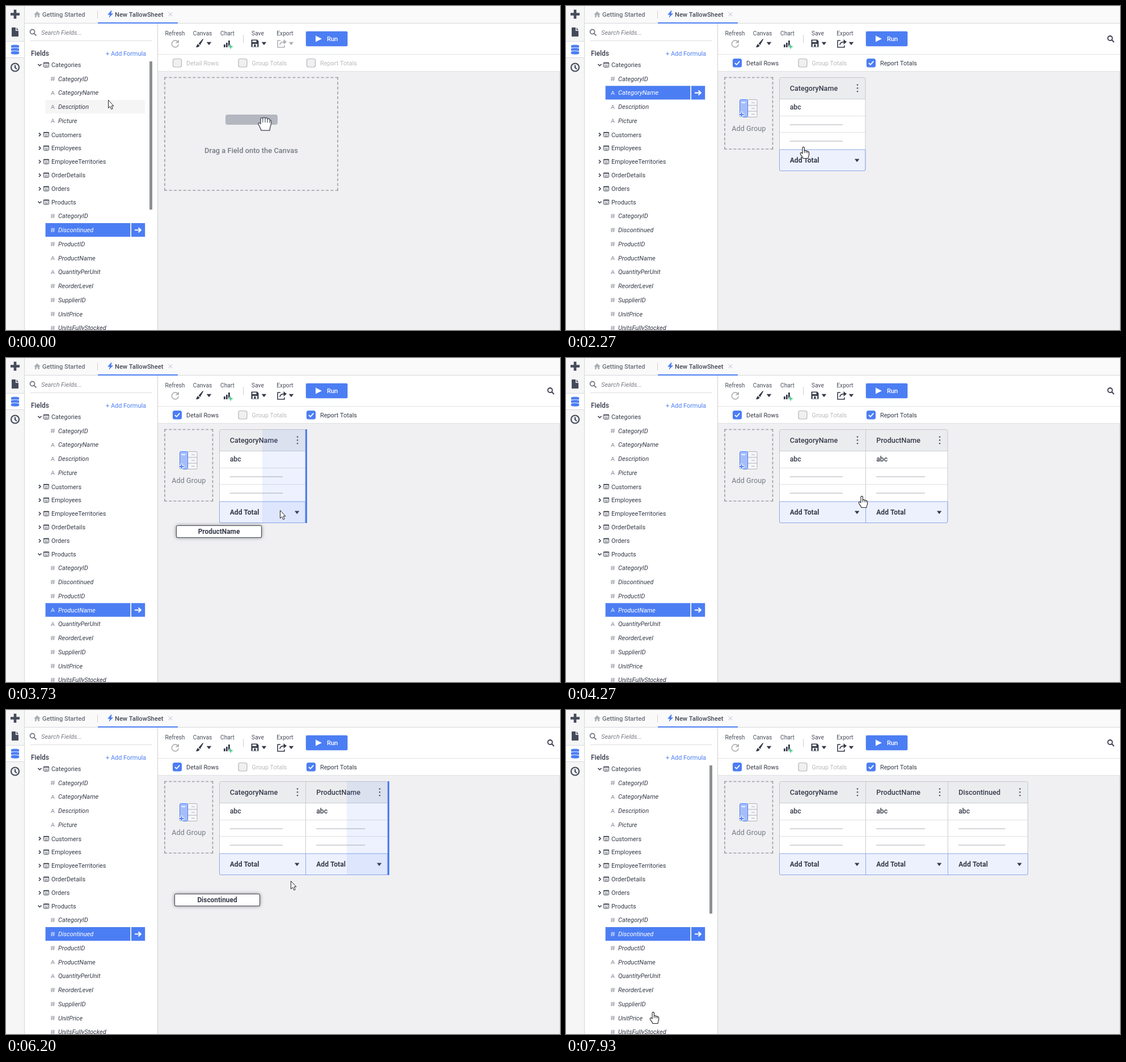
An HTML page with a canvas for the animation above (8 s loop, 977 by 573 pixels).

```html
<!DOCTYPE html>
<html lang="en">
<head>
<meta charset="utf-8">
<title>Report designer</title>
<style>
html, body { margin: 0; width: 100%; height: 100%; overflow: hidden; background: #fff; }
canvas { display: block; }
</style>
</head>
<body>
<canvas id="stage" width="977" height="573"></canvas>
<script>
const c = document.getElementById('stage').getContext('2d');
const LOOP = 8000, FPS = 15;
const BLUE = '#4c7ef3', INK = '#363b49', MUTED = '#b9babf', LINE = '#d6d7db', BG = '#f0f0f2';

// Cursor path: step, x, y
const PATH = [
  [0, 180, 166], [5, 174, 150], [14, 174, 150], [16, 205, 162], [19, 349, 218], [20, 384, 232], [22, 422, 246],
  [33, 422, 246], [36, 402, 270], [41, 262, 405], [44, 208, 448], [46, 205, 436], [48, 205, 436],
  [49, 205, 418], [50, 235, 412], [55, 452, 288], [57, 504, 256], [59, 522, 244],
  [70, 522, 244], [73, 490, 268], [78, 275, 395], [81, 199, 424], [83, 198, 396], [85, 200, 396],
  [92, 449, 317], [93, 502, 302], [95, 611, 244], [96, 640, 228], [98, 656, 218],
  [107, 656, 218], [110, 585, 263], [116, 280, 455], [119, 154, 534]
];
const DRAGS = [
  { from: 15, to: 28, name: 'CategoryName' },
  { from: 49, to: 64, name: 'ProductName' },
  { from: 84, to: 102, name: 'Discontinued' }
];
const COLS = [['CategoryName', 376, 528.5], ['ProductName', 528.5, 673.5], ['Discontinued', 673.5, 815]];
const TABLE_STEP = 29;

const ROWS = [];
function group(name, y, kids = []) {
  ROWS.push({ name, y, open: kids.length > 0 });
  kids.forEach((k, i) => ROWS.push({ name: k.slice(1), kind: k[0], y: y + 24.2 + i * 24.75 }));
}
group('Categories', 104.3, ['#CategoryID', 'ACategoryName', 'ADescription', 'APicture']);
['Customers', 'Employees', 'EmployeeTerritories', 'OrderDetails', 'Orders']
  .forEach((g, i) => group(g, 227.4 + i * 23.95));
group('Products', 347, ['#CategoryID', '#Discontinued', '#ProductID', 'AProductName', 'AQuantityPerUnit',
  '#ReorderLevel', '#SupplierID', '#UnitPrice', '#UnitsFullyStocked']);

// Monotone cubic interpolation along one axis of PATH
function axis(n, k) {
  let i = 0;
  while (i < PATH.length - 2 && PATH[i + 1][0] <= n) i++;
  const slope = j => (PATH[j + 1][k] - PATH[j][k]) / (PATH[j + 1][0] - PATH[j][0]);
  const tangent = j => {
    if (j === 0) return slope(0);
    if (j === PATH.length - 1) return slope(j - 1);
    const a = slope(j - 1), b = slope(j);
    return a * b <= 0 ? 0 : 2 * a * b / (a + b);
  };
  const h = PATH[i + 1][0] - PATH[i][0], u = (n - PATH[i][0]) / h, v = 1 - u;
  return PATH[i][k] * v * v * (1 + 2 * u) + PATH[i + 1][k] * u * u * (3 - 2 * u)
    + h * u * v * (tangent(i) * v - tangent(i + 1) * u);
}
const cursorAt = n => ({ x: Math.round(axis(n, 1)), y: Math.round(axis(n, 2)) });

function text(s, x, y, size, color, weight = 400, align = 'left', style = 'normal') {
  c.font = `${style} ${weight} ${size}px Roboto, sans-serif`;
  c.textAlign = align;
  c.fillStyle = color;
  c.fillText(s, x, y + size * 0.36);
}
function rect(x, y, w, h, color) {
  c.fillStyle = color;
  c.fillRect(x, y, w, h);
}
function round(x, y, w, h, r, fill, stroke, lw = 1) {
  c.beginPath();
  c.roundRect(x, y, w, h, r);
  if (fill) { c.fillStyle = fill; c.fill(); }
  if (stroke) { c.strokeStyle = stroke; c.lineWidth = lw; c.stroke(); }
}
function path(d, x, y, fill, stroke, lw = 1) {
  const p = new Path2D(d);
  c.save();
  c.translate(x, y);
  c.lineJoin = 'round';
  if (fill) { c.fillStyle = fill; c.fill(p); }
  if (stroke) { c.strokeStyle = stroke; c.lineWidth = lw; c.stroke(p); }
  c.restore();
}
const caret = (x, y, color) => path('M-4.2-2.6H4.2L0 3Z', x, y, color);

function lens(x, y, color) {
  path('M3-1A4 4 0 1 1-5-1A4 4 0 1 1 3-1M2 2L6 6', x, y, null, color, 1.8);
}
// Each side starts and ends with a full dash
function dashed(x, y, w, h, fill) {
  if (fill) rect(x, y, w, h, fill);
  const side = (x1, y1, x2, y2) => {
    const len = x2 - x1 + y2 - y1, dash = 5, gaps = Math.round((len - dash) / 8.35);
    c.setLineDash([dash, (len - dash) / gaps - dash]);
    c.beginPath();
    c.moveTo(x1, y1);
    c.lineTo(x2, y2);
    c.stroke();
  };
  c.save();
  c.strokeStyle = '#9fa1a8';
  c.lineWidth = 1.7;
  for (const dy of [0, h]) side(x - 0.8, y + dy, x + w + 0.8, y + dy);
  for (const dx of [0, w]) side(x + dx, y - 0.8, x + dx, y + h + 0.8);
  c.restore();
}

function frameChrome() {
  rect(0, 0, 977, 573, '#fff');
  rect(0, 0, 977, 30, '#fafafa');
  rect(0, 0, 32, 573, '#f6f6f7');
  rect(0, 63, 32, 28, '#fff');
  rect(0, 62, 32, 1, LINE);
  rect(0, 91, 32, 1, LINE);
  rect(32, 0, 1, 573, LINE);
  rect(33, 30, 944, 1, LINE);
  rect(162, 29, 141, 2, BLUE);
  rect(161, 8, 1, 14, '#cfd0d4');

  path('M-8 0H8M0-8V8', 16, 14.5, null, '#454b5a', 4.6);
  path('M-6-8H1V-2H6V8H-6ZM2.5-8L6-3.5H2.5Z', 16, 46, '#454b5a');
  for (let i = 0; i < 3; i++) {
    path('M-7.5-2C-7.5-4.5 7.5-4.5 7.5-2V1C7.5 3.5-7.5 3.5-7.5 1Z', 16, 72 + i * 5.6, BLUE, '#fff', 0.9);
  }
  path('M7 0A7 7 0 1 1-7 0A7 7 0 1 1 7 0M0-4V0.5L3 3', 16, 108.5, null, '#454b5a', 2.2);

  path('M-6 0L0-5.5L6 0H4V5H1.3V1.5H-1.3V5H-4V0Z', 55, 15, '#aeb0b5');
  text('Getting Started', 64, 15, 11.1, '#686d78', 500);
  path('M1-6L-5 1H-1L-2.5 6.5L5-1.5H1L3-6Z', 184, 14.5, BLUE);
  text('New TallowSheet', 192, 14.7, 11.1, '#434856', 500);
  path('M-3.5-3.5L3.5 3.5M3.5-3.5L-3.5 3.5', 290, 14.7, null, '#bbbcc1', 1);

  rect(267, 31, 1, 542, '#cfd0d3');
  rect(268, 115, 709, 458, BG);
  rect(268, 85, 709, 1, '#e2e3e6');
  rect(268, 115, 709, 1, '#dfe0e3');
  rect(976, 116, 1, 457, '#dcdde0');
}

function sidebar(n, cur) {
  lens(47.5, 46.5, '#777b84');
  text('Search Fields...', 62, 46.7, 10.9, '#777b84', 400, 'left', 'italic');
  rect(43, 61, 215, 1, '#dcdde0');
  text('Fields', 44, 84, 11.9, INK, 500);
  text('+ Add Formula', 247, 83.7, 10.9, BLUE, 400, 'right');

  const chosen = n < 15 ? 'Discontinued' : n < 47 ? 'CategoryName' : n < 84 ? 'ProductName' : 'Discontinued';
  const last = cursorAt(Math.max(0, n - 1));
  const slow = Math.hypot(cur.x - last.x, cur.y - last.y) < 40;
  for (const r of ROWS) {
    if (!r.kind) {
      path(r.open ? 'M-3-1.5L0 1.5L3-1.5' : 'M-1.5-3L1.5 0L-1.5 3', 59.5, r.y, null, INK, 1.5);
      round(66.5, r.y - 4, 9, 8, 1, '#fff', '#4a4f5c', 1);
      rect(66, r.y - 4.5, 10, 2, '#4a4f5c');
      path('M2 0H8M2 2.4H8', 66, r.y, null, '#6c707b', 1);
      text(r.name, 80, r.y + 0.2, 10.9, INK);
      continue;
    }
    const on = r.name === chosen;
    const top = r.y - 12;
    if (on) {
      rect(69.6, top, 149.7, 24.2, BLUE);
      rect(221, top, 24.2, 24.2, BLUE);
      path('M-6 0H4M0.5-4L4.8 0L0.5 4', 233, top + 12.3, null, '#fff', 2.2);
    } else if (slow && cur.x >= 70 && cur.x <= 245 && cur.y >= top && cur.y < top + 24.75) {
      rect(69.6, top, 175.6, 24.2, '#f5f5f6');
    }
    const tint = on ? '#e4ebfe' : '#8b8e96';
    if (r.kind === '#') path('M-1.2-4L-2 4M2-4L1.2 4M-3.6-1.5H3.8M-3.8 1.5H3.6', 82.5, r.y + 0.2, null, tint, 0.9);
    else path('M-3 3.5L0-3.5L3 3.5M-2 1.2H2', 82.5, r.y + 0.4, null, tint, 1);
    text(r.name, 92, r.y + 0.2, 11, on ? '#fff' : INK, 400, 'left', 'italic');
  }
  // The scrollbar shows only while the pointer is over the panel
  if (cur.x < 268) rect(253, 98, 5, 262, '#8f9094');
}

function checkbox(x, label, on) {
  round(x + 0.5, 93.5, 15, 14.5, 3, on ? BLUE : '#f0f0f1', on ? BLUE : '#b4b5ba', 1.2);
  if (on) path('M-4 0L-1.2 3L4.2-3', x + 8, 100.8, null, '#fff', 1.8);
  text(label, x + 24, 100.8, 10.9, on ? INK : MUTED);
}

function toolbar(ready) {
  [['Refresh', 298], ['Canvas', 346.5], ['Chart', 390.5], ['Save', 444], ['Export', 492]]
    .forEach(([s, x]) => text(s, x, 48.7, 10.2, '#4a4f5c', 400, 'center'));
  path('M4.5-3.5A6 6 0 1 0 5.8 1.5', 298.5, 66.5, null, '#aeb0b5', 1.7);
  path('M6.5-7V-1H0.5Z', 298.5, 66.5, '#aeb0b5');
  path('M6-8L-1.5 0.5L1.5 3L7-7ZM-2.5 1.5L0.5 4C-0.5 7-4 7.5-6.5 6.5C-4 5.5-5 2-2.5 1.5Z', 341, 66, INK);
  caret(358, 66.3, INK);
  [[384, 5], [388, 8], [392, 12]].forEach(([x, h]) => rect(x, 73 - h, 2.8, h, INK));
  path('M-4 0H4M0-4V4', 396.3, 72, null, '#fff', 3.5);
  path('M-3.5 0H3.5M0-3.5V3.5', 396.3, 72, null, '#37c583', 1.7);
  rect(418, 51, 1, 14, '#cfd0d4');
  path('M-6.5-6.5H4L6.5-4V6.5H-6.5Z', 439, 66, INK);
  rect(434.5, 61, 7, 3, '#fff');
  rect(434.8, 67, 8.4, 5, '#fff');
  rect(437.5, 68, 3, 4, INK);
  caret(455, 66.3, INK);
  const ex = ready ? INK : '#aeb0b5';
  path('M-2-5.5H-7V6.5H5V3M-3 2.5C-3-1.5 0-3 5-3', 486, 66.5, null, ex, 1.6);
  path('M3.5-7.5L9-3L3.5 1.5Z', 486, 66.5, ex);
  caret(503, 66.3, ex);
  round(528.8, 44.8, 73.6, 26.4, 2, BLUE);
  path('M-5-5.5L6 0L-5 5.5Z', 551, 58, '#fff');
  text('Run', 566, 58, 11.1, '#fff', 500);
  if (ready) lens(960.5, 58, INK);
  checkbox(294, 'Detail Rows', ready);
  checkbox(409.5, 'Group Totals', false);
  checkbox(530, 'Report Totals', ready);
}

function dropZone(over) {
  dashed(280, 126.5, 305, 199.5, over ? '#e1e5f3' : null);
  round(387, 192, 92, 18, 4, '#b4b6c0');
  path('M-6 12C-7 7-11 3-11 0C-11-2-8.5-2-7 0.5V-8C-7-11-3.5-11-3.2-8C-3-12 0.8-12 1-8.5C1.5-11.5 5-11 5-7.5C5.5-9.5 9-9.5 9.5-6C13-7 12 1 10 6L9 12Z',
    456, 208, '#fff', '#5d6270', 1.6);
  path('M-3.2-8V-2M1-8.5V-2M5-7.5V-1.5M9.2-6V-1', 456, 208, null, '#5d6270', 1.3);
  text('Drag a Field onto the Canvas', 432.5, 255.5, 12.9, '#777b86', 500, 'center');
}

function addGroup() {
  dashed(280, 126.5, 84.5, 126.5);
  round(320, 165.5, 17, 31, 2, '#f6f6f8', '#b0b2b9', 1);
  path('M0 10.3H17M0 20.6H17M7 5.5H13M7 15.5H13M7 26H13', 320, 165.5, null, '#b0b2b9', 1);
  round(306.5, 165.5, 14, 31, 2, '#a5befa', BLUE, 1);
  rect(309.5, 170, 7, 1.6, '#fff');
  path('M-5 0H5M0-5V5', 309.5, 192, null, BG, 4.5);
  path('M-4 0H4M0-4V4', 309.5, 192, null, BLUE, 1.8);
  text('Add Group', 322.3, 216.8, 12.7, '#777b86', 400, 'center');
}

function table(count, over) {
  const x = 376, right = COLS[count - 1][2], w = right - x;
  round(x, 126.5, w, 165, 3, '#fff');
  rect(x, 126.5, w, 37.5, '#ebecee');
  rect(x, 254, w, 37.5, '#edf1fd');
  [164, 194, 223].forEach((y, i) => rect(x, y, w, 1, i ? '#e0e1e4' : '#cbccd0'));
  COLS.slice(0, count).forEach(([name, l, r], i) => {
    const tx = l + 18.7;
    text(name, tx, 145.5, 12.6, INK, 500);
    [139.5, 145.2, 151].forEach(y => round(r - 15.8, y - 1.3, 2.7, 2.7, 1.35, '#555a66'));
    text('abc', tx, 179, 12.3, INK, 500);
    [209, 238].forEach(y => rect(tx, y, r - l - 59, 2, '#d5d6da'));
    text('Add Total', tx, 273, 12.1, INK, 700);
    caret(r - 15.3, 273, INK);
    if (i < count - 1) {
      rect(Math.floor(r), 127, 1, 127, '#cbccd0');
      rect(Math.floor(r), 254, 1, 38, '#8ea8ea');
    }
  });
  round(x + 0.5, 126.5, w - 1, 165, 3, null, '#c5c6cb');
  path(`M0 0H${w - 1}V35Q${w - 1} 37.5 ${w - 4} 37.5H3Q0 37.5 0 35Z`, x + 0.5, 254, null, '#8ea8ea', 1);
  if (over) {
    const mid = Math.round((COLS[count - 1][1] + right) / 2);
    rect(mid, 126, right - mid, 166, 'rgba(76,126,243,0.1)');
    rect(Math.round(right) - 1, 126, 3, 166, BLUE);
  }
}

function ghost(name, p) {
  const x = p.x - 152, y = p.y + 8;
  c.save();
  c.shadowColor = 'rgba(0,0,0,0.55)';
  c.shadowBlur = 6;
  round(x + 0.5, y + 0.5, 150, 21, 2, '#fff');
  c.restore();
  round(x + 0.5, y + 0.5, 150, 21, 2, null, '#4a4f5c', 1.1);
  text(name, x + 75.5, y + 11, 11.9, INK, 700, 'center');
}

function pointer(p, hand) {
  if (!hand) {
    path('M0.5 0.5V14.5L3.6 11.6L5.8 16.6L8.2 15.6L6 10.8H10Z', p.x, p.y, '#fff', '#222', 1);
    return;
  }
  path('M-2 12V2C-2-0.2 1.4-0.2 1.4 2V7.5C1.8 6 4.3 6.2 4.4 7.8C5 6.8 7 7.2 7.1 8.7C8 8 9.6 8.7 9.6 10.2V13.5C9.6 16 8 17 8 20.5H-1C-1.5 18-5.5 14.5-5.8 12C-6 10-3.5 9.8-2 12Z',
    p.x, p.y, '#fff', '#222', 1.1);
  path('M1.4 7V11M4.4 7.6V11M7.1 8.5V11.5', p.x, p.y, null, '#222', 0.9);
}

function draw(n) {
  const cur = cursorAt(n);
  const drag = DRAGS.find(d => n >= d.from && n < d.to);
  const over = Boolean(drag) && cur.x > 268;
  const count = n < TABLE_STEP ? 0 : n < DRAGS[1].to ? 1 : n < DRAGS[2].to ? 2 : 3;
  frameChrome();
  sidebar(n, cur);
  toolbar(count > 0);
  if (count) {
    addGroup();
    table(count, over);
  } else {
    dropZone(over);
  }
  if (drag) ghost(drag.name, cursorAt(n - 1));
  const onList = cur.x < 248 && n > 0;
  const onTable = !drag && n >= 31 && n !== DRAGS[2].to && count > 0
    && cur.x > 376 && cur.x < COLS[count - 1][2] && cur.y < 292;
  pointer(cur, onList || onTable);
}

const start = performance.now();
function tick() {
  const t = (performance.now() - start) % LOOP;
  draw(Math.floor((t + 5) * FPS / 1000) % (LOOP * FPS / 1000));
  requestAnimationFrame(tick);
}
tick();
</script>
</body>
</html>
```
